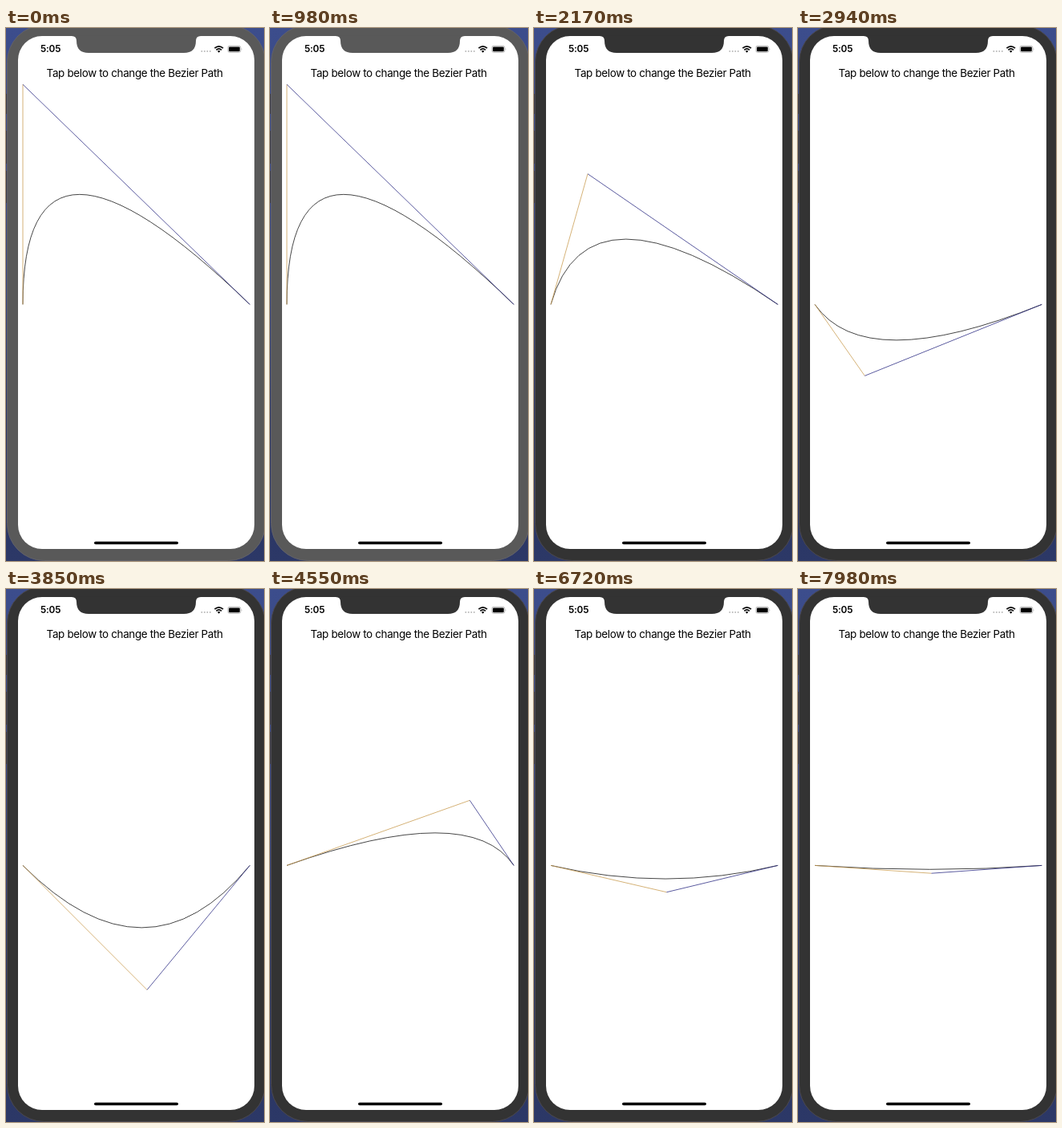
An HTML page for the animation above (8 s loop, 322x664 px).

```html
<!DOCTYPE html>
<html lang="en">
<head>
<meta charset="utf-8">
<title>Bezier path</title>
<style>
  html, body { margin: 0; width: 100%; height: 100%; overflow: hidden; background: #33437d; }
  svg { display: block; width: 100%; height: 100%; }
  text { font-family: Inter, "Liberation Sans", sans-serif; fill: #000; }
  .title { font-size: 13.4px; letter-spacing: -0.33px; }
  .clock { font-size: 11.8px; font-weight: 600; letter-spacing: -0.2px; }
  .line { fill: none; stroke-width: 0.78; }
</style>
</head>
<body>
<svg viewBox="0 0 322 664">
  <defs>
    <linearGradient id="sky" x1="0" y1="0" x2="0" y2="1">
      <stop offset="0" stop-color="#3c4d8c"/>
      <stop offset="0.5" stop-color="#35437c"/>
      <stop offset="0.75" stop-color="#28335f"/>
      <stop offset="1" stop-color="#2c3867"/>
    </linearGradient>
  </defs>
  <rect width="322" height="664" fill="url(#sky)"/>
  <path d="M0.5 82V107M0.5 128V169M0.5 178V218" stroke="#3a3a44"/>
  <rect id="bezel" x="1.5" y="-3.5" width="322" height="667" rx="46"/>
  <rect x="15" y="10" width="295" height="639" rx="30" fill="#fff"/>
  <path id="notch" d="M82 9.5V10Q88 10 88 16C88 26 93 31 103 31H222C232 31 237 26 237 16Q237 10 243 10V9.5Z"/>

  <text class="clock" x="43" y="30.3">5:05</text>
  <g fill="#b9b9b9">
    <circle cx="244.3" cy="29" r="1"/><circle cx="247.8" cy="29" r="1"/>
    <circle cx="251.3" cy="29" r="1"/><circle cx="254.8" cy="29" r="1"/>
  </g>
  <g fill="none" stroke="#000" stroke-width="1.7">
    <path d="M260.4 25.2Q265.7 20.4 271 25.2"/>
    <path d="M262.4 27.4Q265.7 24.4 269 27.4"/>
  </g>
  <path d="M263.9 28.8Q265.7 27.3 267.5 28.8L265.7 30.7Z"/>
  <rect x="276.9" y="22.3" width="16" height="8" rx="2.2" fill="none" stroke="#a5a5a5" stroke-width="0.8"/>
  <rect x="278" y="23.4" width="13.8" height="5.8" rx="1.2"/>
  <path d="M293.8 25Q295.2 26.3 293.8 27.6Z" fill="#a5a5a5"/>

  <text class="title" x="50.6" y="60.6">Tap below to change the Bezier Path</text>

  <path id="curve" class="line" stroke="#111"/>
  <path id="armA" class="line" stroke="#c99c50"/>
  <path id="armB" class="line" stroke="#2c2c84"/>
  <rect x="110" y="639.7" width="105" height="3.6" rx="1.8"/>
</svg>
<script>
  const LOOP = 8000, DIM_AT = 1120;
  const START = [21, 344.4], END = [304.3, 344.4];
  // Each tap: time, then the control point it sets.
  const TAPS = [
    [0, 21, 70.3], [1260, 58, 158.4], [2170, 67, 181.7],
    [2940, 83.3, 433.3], [3850, 176, 499.4], [4550, 249.3, 263.3],
    [5600, 208, 580.4], [6720, 165.5, 377.7], [7490, 166.5, 354.2]
  ];
  const el = id => document.getElementById(id);
  const draw = (id, d) => el(id).setAttribute("d", d);

  function render(t) {
    const tap = TAPS.filter(p => p[0] <= t).pop();
    const control = tap.slice(1);
    draw("curve", `M${START}Q${control} ${END}`);
    draw("armA", `M${START}L${control}`);
    draw("armB", `M${control}L${END}`);
    const shade = t < DIM_AT ? "#595959" : "#333333";
    el("bezel").setAttribute("fill", shade);
    el("bezel").setAttribute("stroke", t < DIM_AT ? "#62626a" : "#4a4850");
    el("notch").setAttribute("fill", shade);
  }

  const begin = performance.now();
  function tick() {
    render((performance.now() - begin) % LOOP);
    requestAnimationFrame(tick);
  }
  tick();
</script>
</body>
</html>
```
